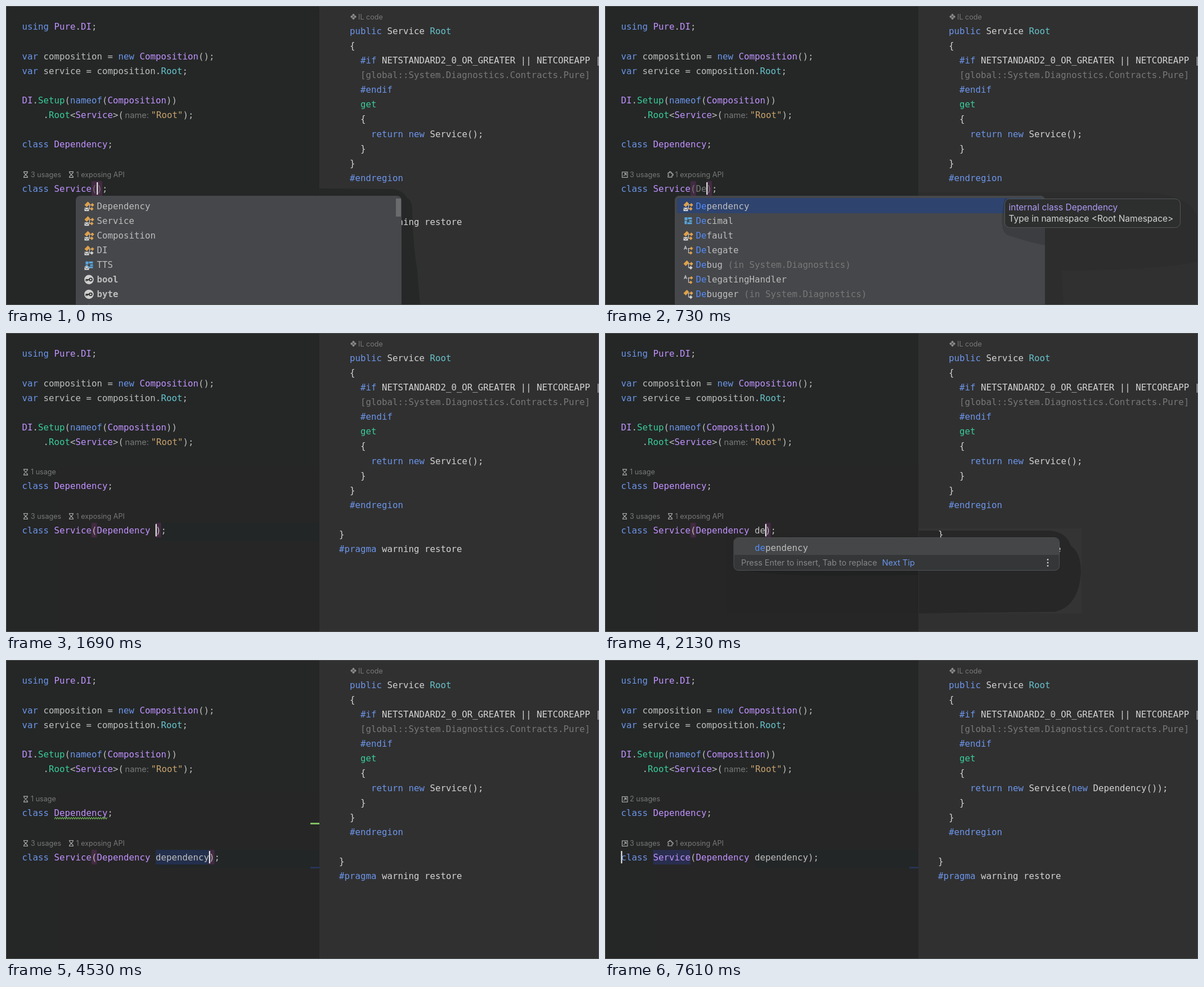
Animation, 1054 px wide and 531 px high, one loop 8000 ms. Source, as an HTML page with a canvas:

```html
<!DOCTYPE html>
<html lang="en">
<head>
<meta charset="utf-8">
<title>Code completion</title>
<style>
html, body { margin: 0; width: 100%; height: 100%; overflow: hidden; background: #242726; }
canvas { display: block; width: 1054px; height: 531px; }
</style>
</head>
<body>
<canvas id="stage"></canvas>
<script>
const W = 1054, H = 531, LOOP = 8000;
const CW = 9.5, LH = 26.13, LEFT = 28.5, RIGHT = 592, SPLIT = 557;
const MONO = '15.78px "DejaVu Sans Mono", "Noto Sans Mono", monospace';
const C = {
  text: '#bdbdbd', bright: '#d2d2d2', key: '#6c95eb', type: '#c191ff', prop: '#66c3cc',
  call: '#39cc9b', str: '#c9a26d', dim: '#787878', match: '#548af7', orange: '#e0a04a',
  blue: '#5aa7dd', icon: '#b4b4b4', paren: '#432a42'
};

const canvas = document.getElementById('stage');
const g = canvas.getContext('2d');
const dpr = window.devicePixelRatio || 1;
canvas.width = Math.round(W * dpr);
canvas.height = Math.round(H * dpr);

const leftY = row => 42.3 + LH * row;
const rightY = row => 49.6 + LH * row;

function rect(x, y, w, h, color) {
  g.fillStyle = color;
  g.fillRect(x, y, w, h);
}

function panel(x, y, w, h, r, fill, border) {
  g.beginPath();
  g.roundRect(x, y, w, h, r);
  g.fillStyle = fill;
  g.fill();
  if (border) {
    g.strokeStyle = border;
    g.lineWidth = 1;
    g.stroke();
  }
}

function shape(fill, draw) {
  g.beginPath();
  draw();
  g.closePath();
  g.fillStyle = fill;
  g.fill();
}

function stroke(color, width, ...lines) {
  g.strokeStyle = color;
  g.lineWidth = width;
  g.beginPath();
  for (const pts of lines) {
    for (let i = 0; i < pts.length; i += 2) {
      if (i) g.lineTo(pts[i], pts[i + 1]);
      else g.moveTo(pts[i], pts[i + 1]);
    }
  }
  g.stroke();
}

// Monospaced runs given as colour, text pairs; returns the end position.
function code(x, y, ...runs) {
  g.font = MONO;
  for (let i = 0; i < runs.length; i += 2) {
    g.fillStyle = C[runs[i]];
    g.fillText(runs[i + 1], x, y);
    x += runs[i + 1].length * CW;
  }
  return x;
}

function label(s, x, y, size, color) {
  g.font = size + 'px Inter, Roboto, sans-serif';
  g.fillStyle = color;
  g.fillText(s, x, y);
}

function diamond(x, y, r, color) {
  shape(color, () => {
    g.moveTo(x, y - r);
    g.lineTo(x + r, y);
    g.lineTo(x, y + r);
    g.lineTo(x - r, y);
  });
}

/* Code lens */

function hourglass(x, y) {
  stroke(C.icon, 1.1,
    [x - 4, y - 5, x + 4, y - 5],
    [x - 4, y + 5, x + 4, y + 5],
    [x - 3, y - 5, x - 3, y - 3, x + 3, y + 3, x + 3, y + 5],
    [x + 3, y - 5, x + 3, y - 3, x - 3, y + 3, x - 3, y + 5]);
}

function arrowBox(x, y) {
  g.strokeStyle = C.icon;
  g.lineWidth = 1.1;
  g.strokeRect(x - 4.5, y - 4.5, 9.5, 9.5);
  stroke(C.icon, 1.1, [x - 2, y + 2.5, x + 2.5, y - 2], [x - 1, y - 2, x + 2.5, y - 2, x + 2.5, y + 1.5]);
}

function puzzle(x, y) {
  stroke(C.icon, 1.1, [x - 4, y - 3, x - 1.5, y - 3, x - 1.5, y - 5, x + 1, y - 5, x + 1, y - 3,
    x + 3, y - 3, x + 3, y - 1, x + 5, y - 1, x + 5, y + 1.5, x + 3, y + 1.5, x + 3, y + 4.5,
    x - 4, y + 4.5, x - 4, y + 2, x - 2.5, y + 1, x - 4, y, x - 4, y - 3]);
}

function lens(y, busy, usages, exposing) {
  const mid = y - 4.2;
  (busy ? hourglass : arrowBox)(35, mid);
  label(usages, 44, y, 12.6, C.dim);
  if (exposing) {
    (busy ? hourglass : puzzle)(116, mid);
    label('1 exposing API', 124.5, y, 12.6, C.dim);
  }
}

/* Completion icons */

function classIcon(x, y, badge) {
  shape(C.orange, () => {
    g.moveTo(x - 8, y - 2);
    g.lineTo(x - 2, y - 8);
    g.lineTo(x + 2, y - 4);
    g.lineTo(x - 4, y + 2);
  });
  stroke('#c8c8c8', 1.2, [x, y - 2, x + 4, y - 2], [x + 1, y - 2, x + 1, y + 5, x + 3, y + 5]);
  diamond(x + 6, y - 2, 3.2, C.orange);
  diamond(x + 5, y + 5, 3.2, badge === 'static' ? '#d0d0d0' : C.orange);
  if (badge === 'mail') envelope(x - 8, y + 3);
}

function envelope(x, y) {
  rect(x, y, 8, 6, '#d8d8d8');
  stroke('#444', 1, [x, y + 1, x + 4, y + 4, x + 8, y + 1]);
}

function delegateIcon(x, y) {
  stroke('#c8c8c8', 1.2, [x - 7, y - 1, x - 4.5, y - 7, x - 2, y - 1], [x - 6, y - 3, x - 3, y - 3],
    [x, y - 3, x + 4, y - 3], [x + 1, y - 3, x + 1, y + 5, x + 3, y + 5]);
  diamond(x + 6, y - 3, 3, C.orange);
  diamond(x + 5, y + 5, 3, C.orange);
}

function structIcon(x, y, badge) {
  rect(x - 6, y - 6, 5, 5, C.blue);
  rect(x, y - 6, 7, 3.5, C.blue);
  rect(x + 2, y - 1, 5, 3, C.blue);
  rect(x - 6, y, 4, 6, C.blue);
  rect(x - 1, y + 3, 8, 3, C.blue);
  if (badge) envelope(x - 8, y + 3);
}

function keyIcon(x, y) {
  g.beginPath();
  g.arc(x, y, 8.3, 0, Math.PI * 2);
  g.fillStyle = '#cfcfcf';
  g.fill();
  g.beginPath();
  g.arc(x + 3, y, 2.4, 0, Math.PI * 2);
  g.strokeStyle = '#333';
  g.lineWidth = 1.8;
  g.stroke();
  stroke('#333', 1.8, [x + 1, y, x - 6, y], [x - 5, y, x - 5, y + 3], [x - 2.5, y, x - 2.5, y + 2.5]);
}

const icons = {
  mail: (x, y) => classIcon(x, y, 'mail'),
  stat: (x, y) => { classIcon(x, y, 'static'); envelope(x - 8, y + 3); },
  cls: (x, y) => classIcon(x, y, 'static'),
  del: delegateIcon,
  struct: structIcon,
  tts: (x, y) => structIcon(x, y, true),
  key: keyIcon
};

const allItems = [
  ['mail', 'Dependency'], ['mail', 'Service'], ['mail', 'Composition'], ['stat', 'DI'],
  ['tts', 'TTS'], ['key', 'bool'], ['key', 'byte'], ['key', 'char']
];
const deItems = [
  ['mail', 'Dependency'], ['struct', 'Decimal'], ['mail', 'Default'], ['del', 'Delegate'],
  ['cls', 'Debug', ' (in System.Diagnostics)'], ['del', 'DelegatingHandler'],
  ['cls', 'Debugger', ' (in System.Diagnostics)'], ['del', 'DelegateFactory']
];

function itemList(items, right, matched) {
  panel(124, 337, right - 124, 220, 8, '#45474a');
  if (matched) panel(128, 341, right - 132, 27, 4, '#2e436e');
  else rect(693, 342, 9, 32, '#696b6d');
  items.forEach(([icon, name, note], i) => {
    const y = 360.7 + LH * i;
    icons[icon](147.5, y - 5.5);
    if (icon === 'key') {
      g.font = 'bold ' + MONO;
      g.fillStyle = C.text;
      g.fillText(name, 161.5, y);
    } else {
      code(161.5, y, 'match', name.slice(0, matched), 'text', name.slice(matched), 'dim', note || '');
    }
  });
}

function tooltip() {
  shape('rgba(30,30,30,.22)', () => {
    g.moveTo(710, 342);
    g.quadraticCurveTo(698, 400, 716, 407);
    g.quadraticCurveTo(755, 420, 782, 425);
    g.lineTo(782, 342);
  });
  panel(710.5, 342.5, 312, 51, 9, '#2d2e2e', '#545657');
  label('internal class Dependency', 717.5, 363, 15.5, '#ae9bf5');
  label('Type in namespace <Root Namespace>', 717.5, 383, 15.5, C.bright);
}

function namePopup(matched) {
  panel(229, 363.5, 578.5, 58, 8, '#343637', '#505254');
  shape('#444647', () => g.roundRect(229.5, 364, 577.5, 30, [8, 8, 0, 0]));
  code(266, 386.7, 'match', 'dependency'.slice(0, matched), 'text', 'dependency'.slice(matched));
  label('Press Enter to insert, Tab to replace', 242, 413, 14.35, '#85878a');
  label('Next Tip', 492.5, 413, 14.6, C.key);
  for (const y of [402.5, 408, 413.5]) {
    g.beginPath();
    g.arc(787, y, 1.4, 0, Math.PI * 2);
    g.fillStyle = '#c8c8c8';
    g.fill();
  }
}

/* Panes */

function shadows(s) {
  if (s.list === 'all') {
    shape('#252827', () => {
      g.moveTo(SPLIT, 324);
      g.lineTo(688, 325);
      g.quadraticCurveTo(706, 328, 714, 342);
      g.quadraticCurveTo(722, 345, 722, 365);
      g.quadraticCurveTo(723, 420, 731, 470);
      g.lineTo(736, H);
      g.lineTo(SPLIT, H);
    });
  } else if (s.list) {
    shape('#2d2d2d', () => {
      g.moveTo(SPLIT, 331);
      g.lineTo(960, 331);
      g.quadraticCurveTo(1040, 335, 1053, 375);
      g.lineTo(1053, 455);
      g.quadraticCurveTo(960, 470, 811, 470);
      g.lineTo(815, H);
      g.lineTo(SPLIT, H);
    });
  }
  if (s.naming) {
    rect(217, 355, SPLIT - 217, 143, '#252525');
    rect(SPLIT + 1, 347, 289, 151, '#343434');
    shape('#272727', () => {
      g.moveTo(SPLIT + 1, 351);
      g.lineTo(790, 351);
      g.quadraticCurveTo(820, 353, 828, 378);
      g.quadraticCurveTo(846, 390, 846, 425);
      g.quadraticCurveTo(842, 485, 800, 495);
      g.lineTo(SPLIT + 1, 498);
    });
    shape('#202121', () => {
      g.moveTo(236, 420);
      g.quadraticCurveTo(290, 430, 400, 431);
      g.lineTo(SPLIT, 430);
      g.lineTo(SPLIT, 420);
    });
  }
}

function leftPane(s) {
  code(LEFT, leftY(0), 'key', 'using ', 'type', 'Pure', 'text', '.', 'type', 'DI', 'text', ';');
  code(LEFT, leftY(2), 'key', 'var', 'text', ' composition = ', 'key', 'new ', 'type', 'Composition', 'text', '();');
  code(LEFT, leftY(3), 'key', 'var', 'text', ' service = composition.', 'prop', 'Root', 'text', ';');
  code(LEFT, leftY(5), 'type', 'DI', 'text', '.', 'call', 'Setup', 'text', '(', 'key', 'nameof',
    'text', '(', 'type', 'Composition', 'text', '))');
  code(LEFT + 4 * CW, leftY(6), 'text', '.', 'call', 'Root', 'text', '<', 'type', 'Service', 'text', '>(');
  label('name:', 211.5, leftY(6) - .5, 14.7, C.dim);
  code(257.5, leftY(6), 'str', '"Root"', 'text', ');');

  const depRow = s.shifted ? 9 : 8, row = s.shifted ? 12 : 11, y = leftY(row);
  if (s.shifted) lens(leftY(8), s.busy, s.usages, false);
  code(LEFT, leftY(depRow), 'key', 'class ', 'type', 'Dependency', 'text', ';');
  if (s.squiggle) {
    const wave = [];
    for (let x = 86, i = 0; x <= 181; x += 2, i++) wave.push(x, i % 2 ? 279.5 : 282.5);
    stroke('#6fb35a', 1.1, wave);
    rect(541, 289, 16, 3, '#7fbf62');
  }
  lens(leftY(row - 1), s.busy, '3 usages', true);

  const top = y - 18.7, openX = LEFT + 13 * CW;
  const closeX = openX + CW * (1 + s.param.length + s.name.length);
  if (s.selected) rect(closeX - 10 * CW, top, 10 * CW, 26, '#232f4c');
  if (s.classMarked) rect(LEFT + 6 * CW, top, 7 * CW, 26, '#292e4f');
  if (!s.atStart) {
    rect(openX, top, CW, 26, C.paren);
    rect(closeX, top, CW, 26, C.paren);
  }
  const parens = s.used ? 'text' : 'dim';
  code(LEFT, y, 'key', 'class ', 'type', 'Service', parens, '(', s.used ? 'type' : 'dim', s.param,
    'text', s.name, parens, ')', 'text', ';');
  if (s.caret) rect(s.atStart ? LEFT : closeX - .2, top + 2, 2, 22, '#f4f4f4');
  if (s.warning) rect(541, 341.5, 16, 2.5, '#e3b52f');
  if (s.blueMark) rect(541, 367.5, 16, 2.5, '#26385f');
}

function rightPane(s) {
  const x = RIGHT + 2 * CW, sem = color => s.plain ? 'bright' : color;
  if (!s.plain) {
    for (const [dx, dy] of [[0, -3], [-3, 0], [3, 0], [0, 3]]) diamond(617.5 + dx, 19 + dy, 2.5, '#8e8e8e');
    label('IL code', 626, 23.5, 12.6, C.dim);
  }
  code(x, rightY(0), 'key', 'public', 'bright', ' Service ', sem('prop'), 'Root');
  code(x, rightY(1), 'bright', '{');
  code(x + 2 * CW, rightY(2), 'key', '#if', 'bright', ' NETSTANDARD2_0_OR_GREATER || NETCOREAPP ||');
  code(x + 2 * CW, rightY(3), sem('dim'), '[global::System.Diagnostics.Contracts.Pure]');
  code(x + 2 * CW, rightY(4), 'key', '#endif');
  code(x + 2 * CW, rightY(5), sem('call'), 'get');
  code(x + 2 * CW, rightY(6), 'bright', '{');
  const end = code(x + 4 * CW, rightY(7), 'key', 'return new ', 'bright', 'Service(');
  if (s.injected) code(end, rightY(7), 'key', 'new ', 'bright', 'Dependency());');
  else code(end, rightY(7), 'bright', ');');
  code(x + 2 * CW, rightY(8), 'bright', '}');
  code(x, rightY(9), 'bright', '}');
  code(x, rightY(10), 'key', '#endregion');
  code(RIGHT, rightY(12), 'bright', '}');
  code(RIGHT, rightY(13), 'key', '#pragma', 'bright', ' warning restore');
}

function stateAt(t) {
  const on = (a, b = LOOP) => t >= a && t < b;
  const typed = t < 470 ? 0 : t < 600 ? 1 : t < 1180 ? 2 : 10;
  return {
    param: 'Dependency'.slice(0, typed) + (on(1480) ? ' ' : ''),
    name: 'dependency'.slice(0, t < 1770 ? 0 : t < 2130 ? 1 : t < 2630 ? 2 : 10),
    list: t < 530 ? 'all' : t < 1180 ? 'de' : '',
    matched: t < 660 ? 1 : 2,
    tip: on(730, 1180),
    naming: on(1840, 2630),
    shifted: on(1690),
    used: on(1420),
    busy: on(0, 220) || on(1370, 2630) || on(2840, 3230) || on(4530, 4720) || on(6590, 6860),
    usages: on(4720) ? '2 usages' : '1 usage',
    warning: on(1180, 1540),
    squiggle: on(2770, 4800),
    selected: on(2700, 7500),
    blueMark: on(2700),
    classMarked: on(7610),
    atStart: on(7500),
    caret: !on(5380, 5870) && !on(6250, 6450),
    plain: on(5440, 5600),
    injected: on(6310)
  };
}

function draw(t) {
  const s = stateAt(t);
  g.setTransform(dpr, 0, 0, dpr, 0, 0);
  rect(0, 0, W, H, '#242726');
  if (s.shifted) {
    rect(90, 235, SPLIT - 90, H - 235, '#262626');
    rect(28, 235, 62, 265, '#252626');
    if (!s.naming) rect(266, 337, SPLIT - 266, 33, '#232627');
  } else if (!s.list) {
    rect(120, 311, SPLIT - 120, H - 311, '#262626');
  }
  rect(SPLIT, 0, W - SPLIT, H, '#303030');
  shadows(s);
  leftPane(s);
  rightPane(s);
  if (s.list === 'all') itemList(allItems, 703, 0);
  if (s.list === 'de') itemList(deItems, 782, s.matched);
  if (s.tip) tooltip();
  if (s.naming) namePopup(s.name.length);
  g.strokeStyle = '#505252';
  g.lineWidth = 1;
  g.strokeRect(.5, .5, W - 1, H - 1);
}

const start = performance.now();
function tick() {
  draw((performance.now() - start) % LOOP);
  requestAnimationFrame(tick);
}
tick();
</script>
</body>
</html>
```
